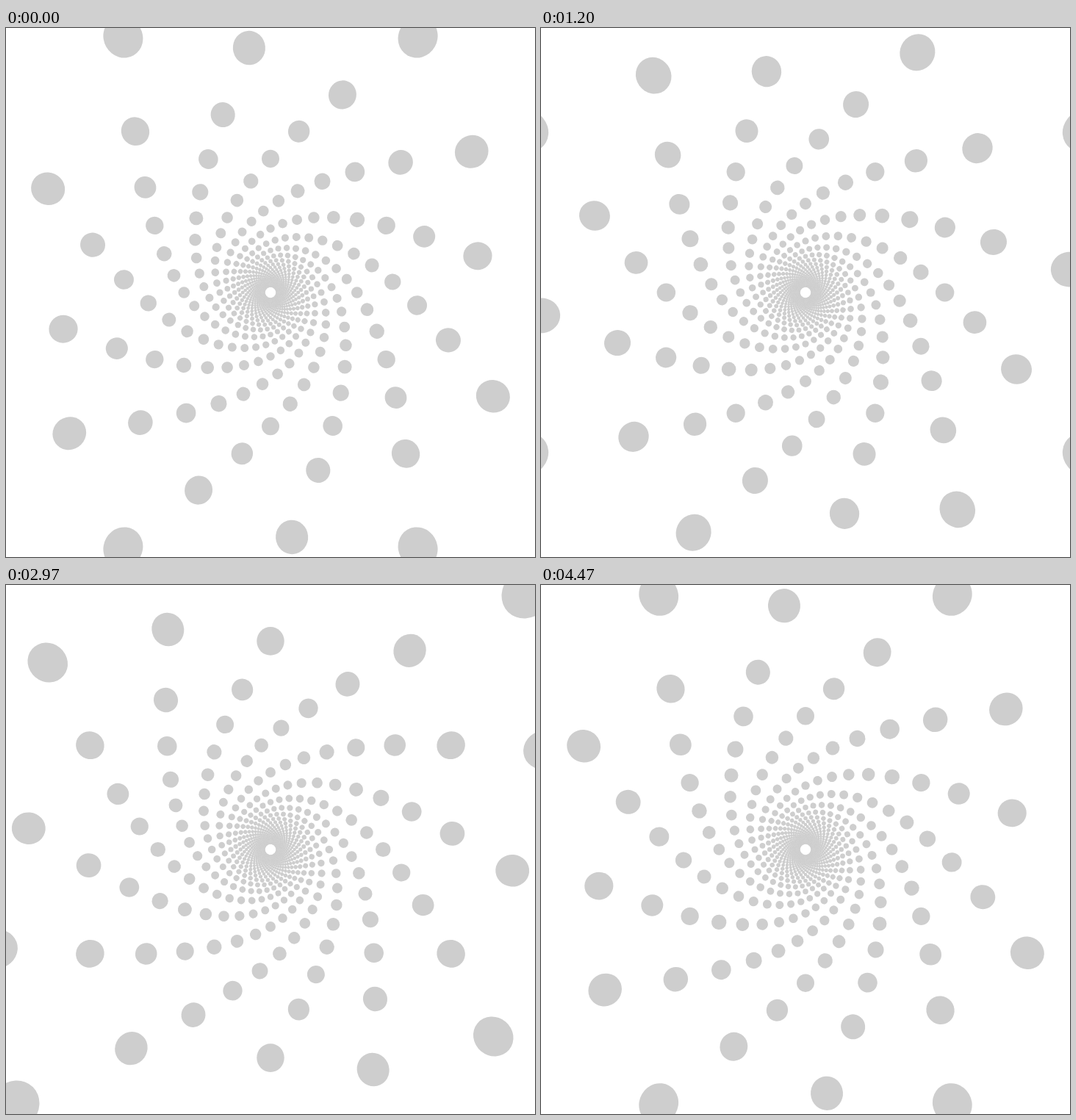
Animation of 720x720 px, one loop 4500 ms. Source, as an HTML page with a canvas:

```html
<!DOCTYPE html>
<html lang="en">
<head>
<meta charset="utf-8">
<title>Dot tunnel</title>
<style>
  html, body { margin: 0; width: 100%; height: 100%; overflow: hidden; background: #fff; }
  canvas { display: block; }
</style>
</head>
<body>
<canvas id="stage" width="720" height="720"></canvas>
<script>
const SIZE = 720, CENTER = SIZE / 2;
const STEP_MS = 30, STEPS = 150;
const FOCAL = 1000;          // tunnel radius is 1, so a ball at depth z lands FOCAL / z from the centre
const BALL = 0.066;
const ROWS = 72;             // straight rows of balls along the tunnel wall
const GAP = 6;               // depth between two balls of a row
const ROW_SHIFT = 3.5;       // depth offset from one row to the next
const START = 5.4925, SPEED = 0.08047;
const NEAR = 1.5, FAR = 134;

const ctx = document.getElementById('stage').getContext('2d');
const mod = (a, n) => ((a % n) + n) % n;

function drawBall(angle, z) {
  const r = FOCAL / z;
  const across = r * BALL;
  const along = across * Math.hypot(1, r / FOCAL); // perspective stretches balls outwards
  ctx.beginPath();
  ctx.ellipse(CENTER - r * Math.sin(angle), CENTER - r * Math.cos(angle),
    across, along, -angle, 0, Math.PI * 2);
  ctx.fill();
}

function draw(step) {
  ctx.fillStyle = '#fff';
  ctx.fillRect(0, 0, SIZE, SIZE);
  ctx.fillStyle = '#cecece';
  for (let row = 0; row < ROWS; row++) {
    const angle = row / ROWS * Math.PI * 2;
    const first = mod(START + ROW_SHIFT * row - SPEED * step - NEAR, GAP) + NEAR;
    for (let z = first; z < FAR; z += GAP) drawBall(angle, z);
  }
}

const begin = performance.now();
let shown = -1;

function tick() {
  const step = Math.floor((performance.now() - begin) / STEP_MS) % STEPS;
  if (step !== shown) draw(shown = step);
  requestAnimationFrame(tick);
}
tick();
</script>
</body>
</html>
```
